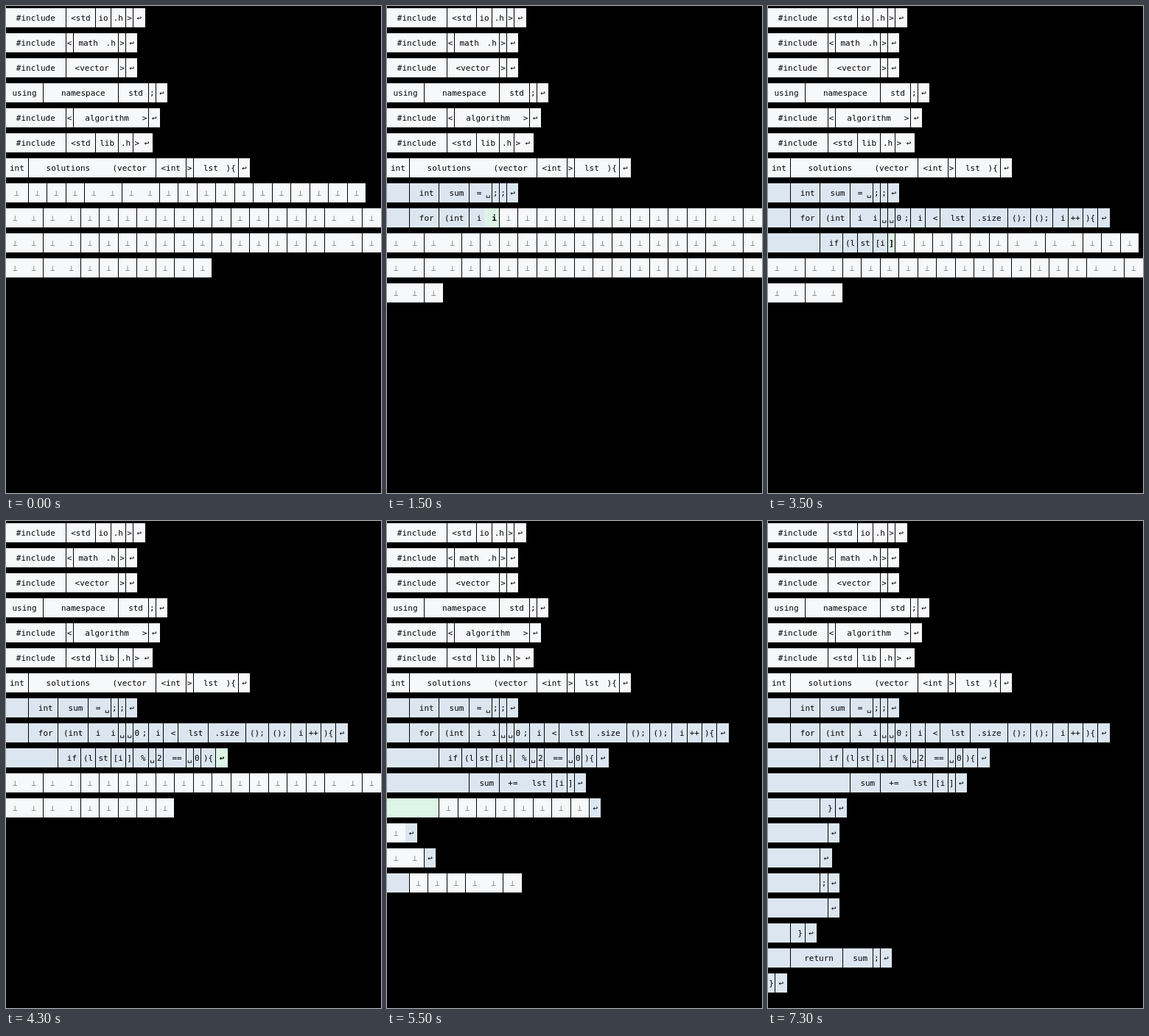
An HTML page for the animation above (7900 ms loop, 509 by 662 pixels).

```html
<!DOCTYPE html>
<html lang="en">
<head>
<meta charset="utf-8">
<title>Code denoising, token by token</title>
<style>
  html, body { margin: 0; width: 100%; height: 100%; overflow: hidden; background: #000; }
  svg { display: block; width: 509px; height: 662px; }
  text { font: 11px "DejaVu Sans Mono", monospace; text-anchor: middle; fill: #000; }
  .plain rect, .mask rect { fill: #f7f8fa; }
  .mask text { fill: #888; }
  .done rect { fill: #dce6f1; }
  .fresh rect { fill: #dcf5e5; }
  .fresh text { font-weight: bold; }
</style>
</head>
<body>
<svg viewBox="0 0 509 662"><g id="prompt"></g><g id="body"></g></svg>
<script>
// Layout units: a character is 20 wide, a mask 50, a line break 32.
const UNIT = 0.5094, GAP = 0.88, LINE = 1000, ADVANCE = 6.623;
const TOP = 3, PITCH = 34, HEIGHT = 26, BASE = 17;
const START = 300, STEP = 100, LOOP = 7900;
const NL = '↩', MASK = '⊥';

const pad = n => ' '.repeat(n);
const range = (a, b) => Array.from({ length: b - a + 1 }, (_, i) => a + i);
const lines = rows => rows.flatMap(row => [...row, NL]);

const prompt = lines([
  ['#include', '<std', 'io', '.h', '>'],
  ['#include', '<', 'math', '.h', '>'],
  ['#include', '<vector', '>'],
  ['using', ' namespace', ' std', ';'],
  ['#include', '<', 'algorithm', '>'],
  ['#include', '<std', 'lib', '.h', '>'],
  ['int', ' solutions', '(vector', '<int', '>', ' lst', '){'],
]);

const body = lines([
  [pad(3), ' int', ' sum', ' =', '␣', ';', ';'],
  [pad(3), ' for', '(int', ' i', ' i', '␣', '␣', '0', ';', ' i', ' <', ' lst',
    '.size', '();', '();', ' i', '++', '){'],
  [pad(7), ' if', '(l', 'st', '[i', ']', ' %', '␣', '2', ' ==', '␣', '0', '){'],
  [pad(11), ' sum', ' +=', ' lst', '[i', ']'],
  [pad(7), ' }'],
  [pad(8)],
  [pad(7)],
  [pad(7), ';'],
  [pad(8)],
  [pad(3), ' }'],
  [pad(3), ' return', ' sum', ';'],
  ['}'],
]);

// Token indices in the order they are revealed.
const order = [
  0, 1, 2, 3, 7, 6, 4, 5,
  ...range(8, 18), 20, 19, ...range(21, 41),
  59, 62, 63, 44, 43, 57, 42, 45, 46, 47, 48, 50,
  60, 61, 58, 49, 52, 51, ...range(53, 56), ...range(64, 69),
];
const rank = [];
order.forEach((token, i) => { rank[token] = i + 1; });

function add(parent, tag, attrs = {}) {
  const el = document.createElementNS('http://www.w3.org/2000/svg', tag);
  for (const key in attrs) el.setAttribute(key, attrs[key]);
  return parent.appendChild(el);
}

function drawCell(parent, { text, kind, width }, x, row) {
  const from = x * UNIT, to = (x + width) * UNIT - GAP;
  const left = Math.round(from), y = TOP + row * PITCH;
  const cell = add(parent, 'g', { class: kind });
  add(cell, 'rect', { x: left, y, width: Math.round(to) - left, height: HEIGHT });
  const word = text.trim();
  if (!word) return;
  const lead = text.length - word.length;
  const center = (from + to + lead * ADVANCE) / 2;
  add(cell, 'text', { x: center.toFixed(2), y: y + BASE }).textContent = word;
}

function flow(id, cells, row) {
  const parent = document.getElementById(id);
  parent.replaceChildren();
  let x = 0;
  for (const cell of cells) {
    if (x + cell.width > LINE) { x = 0; row++; }
    drawCell(parent, cell, x, row);
    x += cell.width;
    if (cell.text === NL) { x = 0; row++; }
  }
}

const wordCell = (text, kind) => ({ text, kind, width: text === NL ? 32 : text.length * 20 });

function bodyCell(text, i, step) {
  if (rank[i] > step) return { text: MASK, kind: 'mask', width: i ? 50 : 60 };
  return wordCell(text, rank[i] === step ? 'fresh' : 'done');
}

let shown = -1;
function tick() {
  const t = performance.now() % LOOP;
  const step = t < START ? 0 : Math.min(order.length + 1, Math.floor((t - START) / STEP) + 1);
  if (step !== shown) {
    shown = step;
    flow('body', body.map((text, i) => bodyCell(text, i, step)), 7);
  }
  requestAnimationFrame(tick);
}

flow('prompt', prompt.map(text => wordCell(text, 'plain')), 0);
tick();
</script>
</body>
</html>
```
